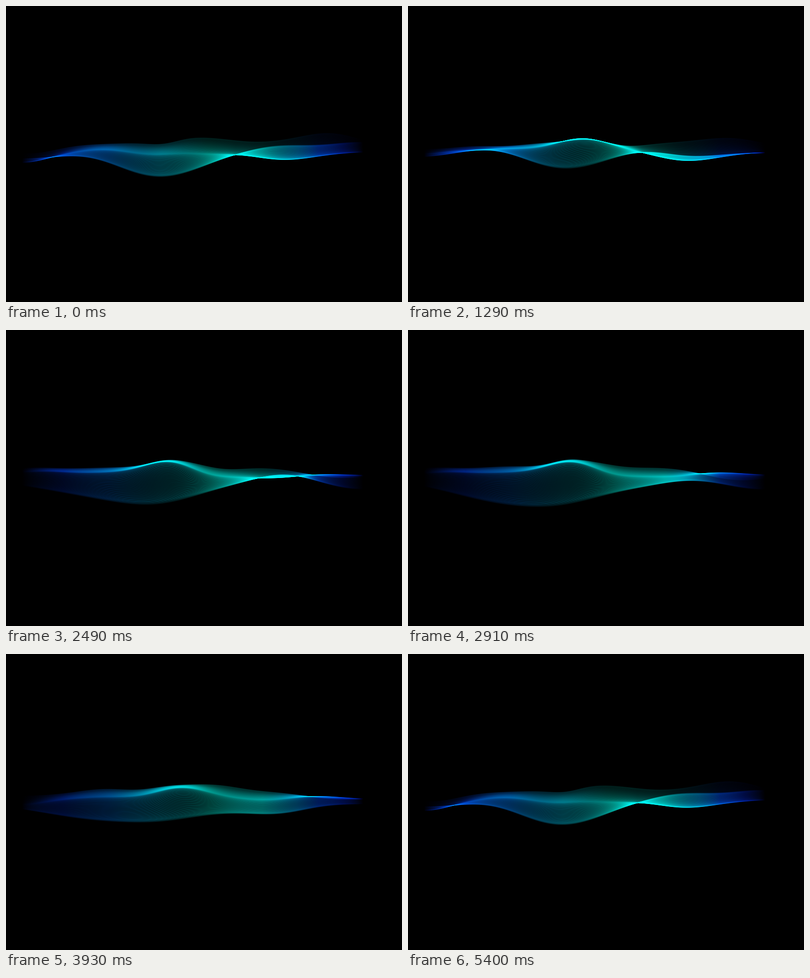
Write an HTML page with a canvas that moves like this. It is 800 by 600 pixels and loops after 5430 ms.

```html
<!DOCTYPE html>
<html lang="en">
<head>
<meta charset="utf-8">
<title>Light ribbon</title>
<style>
  html, body { margin: 0; width: 100%; height: 100%; overflow: hidden; background: #000; }
  canvas { display: block; width: 800px; height: 600px; }
</style>
</head>
<body>
<canvas id="stage" width="800" height="600"></canvas>
<script>
const LOOP = 5430, STEP = 30;
const LEFT = 32, RIGHT = 736, DX = 4;
const STRANDS = 120;

// A swell is a rounded bump at one x whose height follows a cosine of the loop angle.
const swell = turns => (size, centre, width, degrees = 0) => (x, angle) =>
  size * Math.exp(-(((x - centre) / width) ** 2)) * Math.cos(turns * angle - degrees * Math.PI / 180);
const still = swell(0), sway = swell(1), flutter = swell(2);

const guide = (base, ...swells) => (x, angle) =>
  swells.reduce((y, height) => y + height(x, angle), base);

// Three strands that carry the sheet: its two rims and the fold between them.
const guides = [
  guide(278,
    still(11, 40, 100), still(-10, 365, 70), still(8, 740, 70),
    sway(10, 50, 70), sway(5, 195, 60, 80), sway(8, 320, 45, 10),
    sway(10, 435, 60, 118), sway(24, 660, 92, 205)),
  guide(295,
    still(8, 30, 60), still(-5, 200, 80), still(-17, 345, 70), still(9, 550, 75),
    sway(15, 40, 85, -17), sway(17, 320, 75, -12), sway(13, 590, 95, 50),
    flutter(9, 385, 80, -15)),
  guide(300,
    still(12, 70, 120), still(42, 305, 130),
    sway(27, 170, 110, 225), sway(15, 490, 110, 237), sway(24, 720, 110, 180),
    flutter(9, 260, 170), flutter(14, 560, 80, 138))
];

const ctx = document.getElementById("stage").getContext("2d");
const tint = ctx.createLinearGradient(LEFT, 0, RIGHT, 0);
[
  [0, 0, 0], [.12, 9, 40], [.25, 34, 72], [.4, 72, 86], [.54, 82, 74],
  [.69, 82, 80], [.79, 46, 74], [.85, 17, 62], [.92, 5, 32], [.98, 0, 0]
].forEach(([at, g, b]) => tint.addColorStop(at, `rgb(0,${g},${b})`));

const ease = s => s * s * (3 - 2 * s);

function hermite(a, b, slopeA, slopeB, s) {
  return a + (b - a) * ease(s) + slopeA * s * (1 - s) ** 2 - slopeB * s * s * (1 - s);
}

// Cross-section of the sheet at one x; it turns back at the crease where it folds.
function section(x, angle) {
  const [top, mid, end] = guides.map(yAt => yAt(x, angle));
  const a = mid - top, b = end - mid;
  const bend = a * b > 0 ? 1.5 * a * b / (a + b) : 0;
  return u => u < .5
    ? hermite(top, mid, .6 * a, bend, u * 2)
    : hermite(mid, end, bend, .6 * b, u * 2 - 1);
}

function strength(u) {
  const rise = .15 + .65 * ease(Math.min(1, u * 2));
  return rise * Math.min(1, .2 + (1 - u) / .06);
}

function draw(t) {
  const angle = t / LOOP * 2 * Math.PI;
  const sections = [];
  for (let x = LEFT; x <= RIGHT; x += DX) sections.push(section(x, angle));

  ctx.globalCompositeOperation = "source-over";
  ctx.globalAlpha = 1;
  ctx.fillStyle = "#000";
  ctx.fillRect(0, 0, 800, 600);

  ctx.globalCompositeOperation = "screen";
  ctx.strokeStyle = tint;
  ctx.lineWidth = 1;
  for (let i = 0; i < STRANDS; i++) {
    const u = i / (STRANDS - 1);
    ctx.globalAlpha = strength(u);
    ctx.beginPath();
    sections.forEach((yAt, j) => ctx.lineTo(LEFT + j * DX, yAt(u)));
    ctx.stroke();
  }
}

function tick() {
  draw(Math.floor(performance.now() % LOOP / STEP) * STEP);
  requestAnimationFrame(tick);
}
tick();
</script>
</body>
</html>
```
